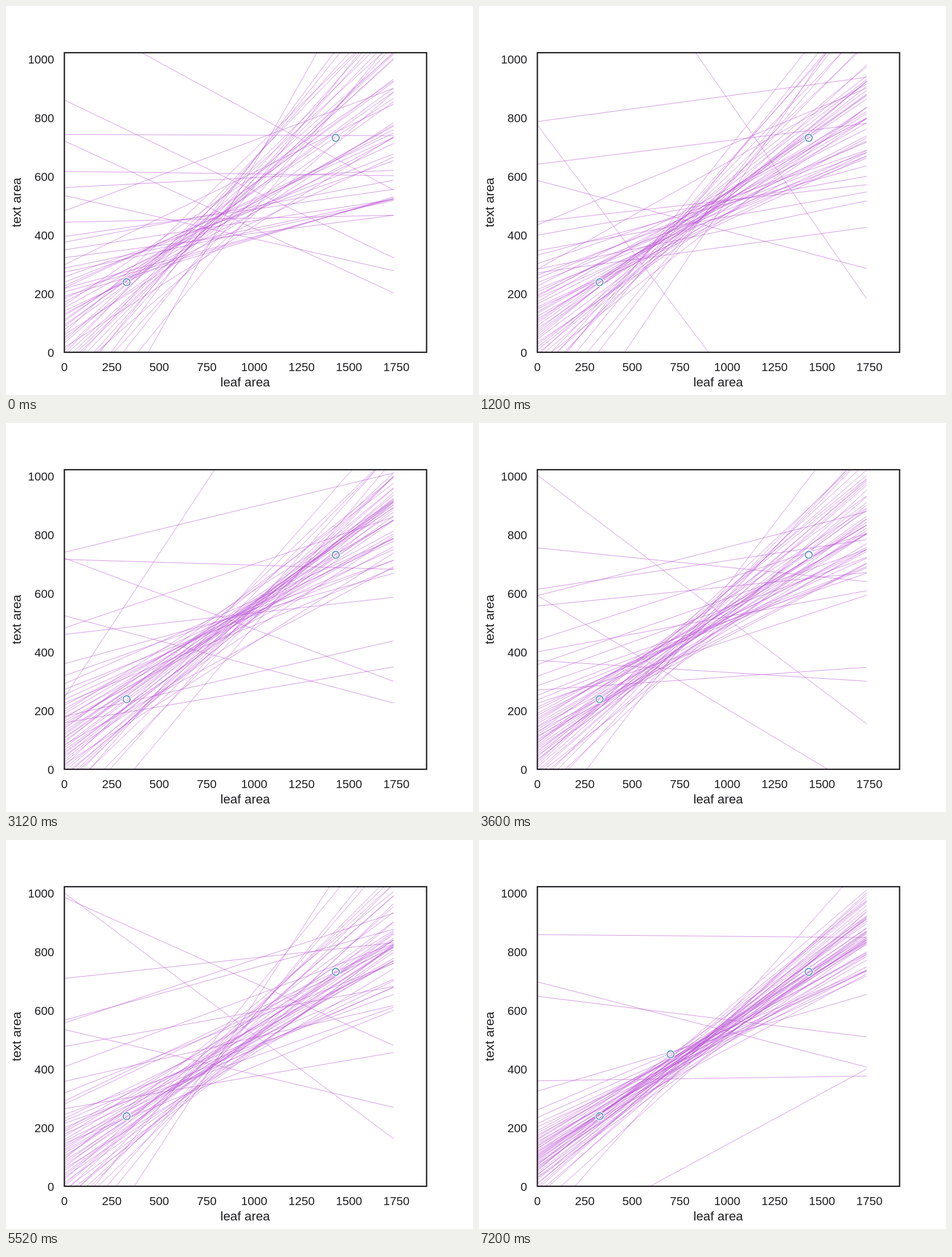
An HTML page with a canvas that plays this animation: 820x683 px, repeating every 8000 ms.

```html
<!DOCTYPE html>
<html>
<head>
<meta charset="utf-8">
<style>
  html, body { margin: 0; width: 100%; height: 100%; overflow: hidden; background: #fff; }
  canvas { display: block; }
</style>
</head>
<body>
<canvas id="stage" width="820" height="683"></canvas>
<script>
const ctx = document.getElementById('stage').getContext('2d');
const LOOP = 8000, STEP = 1200, X_END = 1735;
const BOX = { x: 102.5, y: 82, w: 636, h: 526 };
const px = v => BOX.x + v * 0.3332;
const py = v => 608 - v * 0.515;

// left, mid: spread of the sampled lines at x = 0 and at the middle.
// strays: how many lines ignore the trend. key: two salient lines [y at 0, y at X_END].
const scenes = [
  { left: 215, mid: 62, strays: 5, key: [[1165, 553], [860, 322]] },
  { left: 180, mid: 50, strays: 6, key: [[775, -716], [1797, 183]] },
  { left: 140, mid: 55, strays: 6, key: [[740, 1010], [245, 1947]] },
  { left: 115, mid: 48, strays: 8, key: [[1003, 155], [592, -79]] },
  { left: 155, mid: 68, strays: 4, key: [[1000, 162], [985, 480]] },
  { left: 80, mid: 30, strays: 1, key: [[502, 752], [-258, 631]] },
  { left: 82, mid: 27, strays: 3, key: [[858, 848], [-208, 400]] }
];
const COUNT = 58;
const points = [[328, 239], [1430, 731], [702, 450]];

const random = (i, seed) => {
  const s = Math.sin(i * 12.9898 + seed * 78.233) * 43758.5453;
  return s - Math.floor(s);
};
const bell = u => 0.55 * Math.log(u / (1 - u));

function sampleLines({ left, mid, strays, key }, seed) {
  const n = COUNT - strays - key.length;
  const trend = Array.from({ length: n }, (_, i) => {
    const a = 95 + left * bell((i + 0.2 + 0.6 * random(i, seed)) / n);
    const m = 477 + mid * bell(0.02 + 0.96 * random(i + 100, seed));
    return [a, 2 * m - a];
  });
  const loose = Array.from({ length: strays }, (_, i) =>
    [150 + 650 * random(i + 200, seed), 200 + 750 * random(i + 300, seed)]);
  return [...trend, ...loose, ...key];
}
const sceneLines = scenes.map((scene, k) => sampleLines(scene, k + 1));

function text(str, x, y, size, align) {
  ctx.font = `${size}px "Liberation Sans", Arial, sans-serif`;
  ctx.textAlign = align;
  ctx.fillText(str, x, y);
}

function ring(x, y, color, width) {
  ctx.strokeStyle = color;
  ctx.lineWidth = width;
  ctx.beginPath();
  ctx.arc(x, y, 6.1, 0, 2 * Math.PI);
  ctx.stroke();
}

function drawLines(lines) {
  ctx.save();
  ctx.beginPath();
  ctx.rect(BOX.x, BOX.y, BOX.w, BOX.h);
  ctx.clip();
  ctx.strokeStyle = 'rgba(186, 85, 211, 0.62)';
  ctx.lineWidth = 1;
  for (const [a, b] of lines) {
    ctx.beginPath();
    ctx.moveTo(px(0), py(a));
    ctx.lineTo(px(X_END), py(b));
    ctx.stroke();
  }
  ctx.restore();
}

function drawAxes() {
  ctx.strokeStyle = ctx.fillStyle = '#1f1d21';
  ctx.lineWidth = 2.3;
  ctx.strokeRect(BOX.x, BOX.y, BOX.w, BOX.h);
  for (let v = 0; v <= 1750; v += 250) text(v, px(v), 640.5, 20.7, 'center');
  for (let v = 0; v <= 1000; v += 200) text(v, 84.5, py(v) + 7.5, 20.7, 'right');
  text('leaf area', 420, 668, 22.4, 'center');
  ctx.save();
  ctx.translate(26, 345);
  ctx.rotate(-Math.PI / 2);
  text('text area', 0, 0, 22.4, 'center');
  ctx.restore();
}

function draw(now) {
  const k = Math.floor(now % LOOP / STEP);
  ctx.fillStyle = '#fff';
  ctx.fillRect(0, 0, 820, 683);
  drawLines(sceneLines[k]);
  for (const [x, y] of points.slice(0, k < 5 ? 2 : 3)) {
    ring(px(x), py(y), '#fff', 4.2);
    ring(px(x), py(y), '#4c8cb8', 1.7);
  }
  drawAxes();
  requestAnimationFrame(draw);
}
requestAnimationFrame(draw);
</script>
</body>
</html>
```
